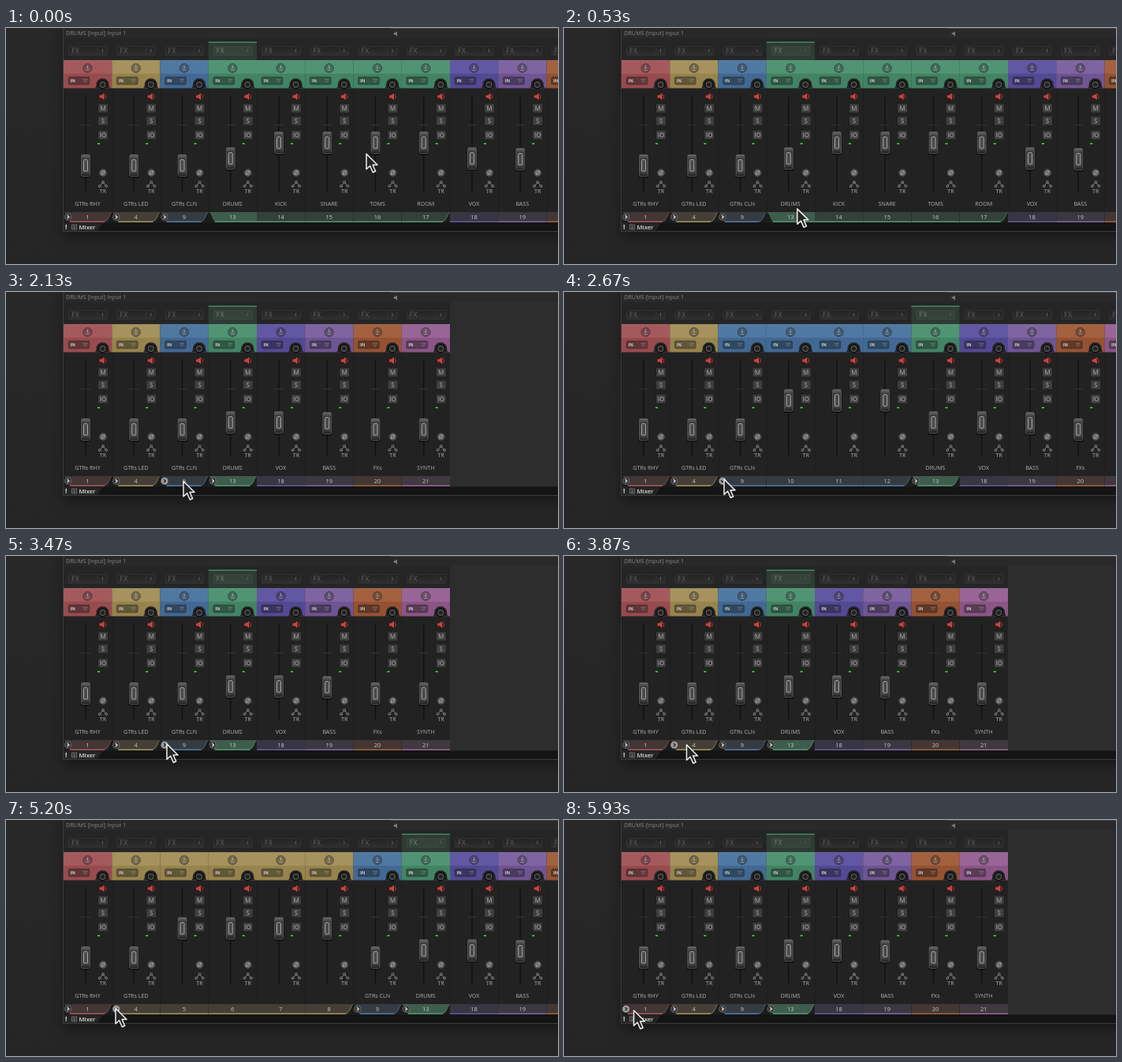
Animation, 700 px wide and 300 px high, one loop 6 s. Source, as an HTML page:

```html
<!DOCTYPE html>
<html lang="en">
<head>
<meta charset="utf-8">
<title>Mixer folders</title>
<style>
  html, body { margin: 0; width: 100%; height: 100%; overflow: hidden; background: #262626; }
  svg { display: block; width: 700px; height: 300px; }
  text { font-family: "Open Sans", "Noto Sans", sans-serif; }
  .deep { mix-blend-mode: multiply; }
  .icon circle { fill: #343434; stroke: #777; }
  .icon path { stroke: #e6e6e6; }
  .icon.hover circle { fill: #9a9a9a; stroke: #aaa; }
  .icon.hover path { stroke: #222; }
</style>
</head>
<body>
<svg id="stage" viewBox="0 0 700 300" xmlns="http://www.w3.org/2000/svg">
  <defs>
    <linearGradient id="bg" x2="0" y2="1">
      <stop offset="0" stop-color="#282828"/><stop offset="1" stop-color="#252525"/>
    </linearGradient>
    <linearGradient id="fx" x2="0" y2="1">
      <stop offset="0" stop-color="#222"/><stop offset="1" stop-color="#303030"/>
    </linearGradient>
    <linearGradient id="cap" x2="0" y2="1">
      <stop offset="0" stop-color="#6a6a6a"/><stop offset=".2" stop-color="#3c3c3c"/>
      <stop offset=".8" stop-color="#444"/><stop offset="1" stop-color="#1c1c1c"/>
    </linearGradient>
    <filter id="blur" x="-10%" y="-20%" width="120%" height="140%"><feGaussianBlur stdDeviation="9"/></filter>
  </defs>
  <rect width="700" height="300" fill="url(#bg)"/>
  <rect x="74" y="-20" width="660" height="286" fill="#000" opacity=".38" filter="url(#blur)"/>
  <rect x="72" y="-2" width="640" height="261" fill="#3c3c3c"/>
  <rect x="73" width="627" height="248" fill="#2d2d2d"/>
  <rect x="73" width="627" height="13" fill="#292929"/>
  <rect x="487" width="213" height="1" fill="#444"/>
  <text x="76" y="9" font-size="7.3" fill="#868686">DRUMS [input] Input 1</text>
  <path d="M496 4.300v6l-5-3z" fill="#777"/>
  <g id="layouts"></g>
  <rect x="73" y="247.500" width="627" height="10.500" fill="#141414"/>
  <path d="M73 247.500H126Q121 248 119 253T113 258H73z" fill="#252525"/>
  <text x="75" y="256" font-size="8.500" font-weight="700" fill="#ddd">!</text>
  <path d="M83.500 250h6v6h-6zM85 251.800h3M85 253.200h3M85 254.600h3" fill="none" stroke="#888" stroke-width=".7"/>
  <text x="92.500" y="256" font-size="7.600" font-weight="600" fill="#dcdcdc">Mixer</text>
  <path id="cursor" d="M0 0V19.500L4.600 15.300 8.300 23.500 11.700 22 8.100 14H14z" fill="#262626" stroke="#eee" stroke-width="1.500" stroke-linejoin="round"/>
</svg>
<script>
const LOOP = 6000, STEP = 1000 / 15, LEFT = 73, PITCH = 61.25;
const red = '#a6595d', yellow = '#a5925c', blue = '#5079a2', green = '#509474',
      purple = '#6257a2', violet = '#7f64a2', orange = '#a4613f', pink = '#996496';

// number, name, colour, fader centre, folder it lives in
const tracks = [
  [1, 'GTRs RHY', red, 175], [4, 'GTRs LED', yellow, 175],
  ...[5, 6, 7, 8].map(n => [n, '', yellow, 138, 4]),
  [9, 'GTRs CLN', blue, 175],
  ...[10, 11, 12].map(n => [n, '', blue, 138, 9]),
  [13, 'DRUMS', green, 166],
  ...['KICK', 'SNARE', 'TOMS', 'ROOM'].map((name, i) => [14 + i, name, green, 146, 13]),
  [18, 'VOX', purple, 166], [19, 'BASS', violet, 167],
  [20, 'FXs', orange, 175], [21, 'SYNTH', pink, 175]
].map(([num, name, color, fader, parent]) => ({ num, name, color, fader, parent }));
const folders = [1, 4, 9, 13], selected = 13;

// start time, open folder (0 = all closed)
const states = [[0, 13], [1266, 0], [2666, 9], [3466, 0], [4399, 4], [5266, 0]];

// time, x, y of the pointer tip
const path = [
  [0, 457, 160], [667, 277, 238], [933, 265, 240.5], [1067, 265, 240.5], [1133, 264, 240.5],
  [1533, 264, 240.5], [1600, 262.5, 239], [1800, 262.5, 239], [2133, 225, 240.5],
  [2400, 202, 238], [2600, 203, 238], [3000, 203, 238], [3067, 206, 238], [3333, 206, 238],
  [3467, 204, 239], [3867, 155.5, 240], [4000, 143, 239], [4133, 138, 239], [5133, 138, 239],
  [5200, 139, 239.5], [5333, 138, 240], [5800, 108, 243], [5933, 88.5, 242], [6000, 88.5, 242]
];

const rect = (x, y, w, h, fill, more = '') =>
  `<rect x="${x}" y="${y}" width="${w}" height="${h}" fill="${fill}" ${more}/>`;
const label = (x, y, size, fill, str, more = 'text-anchor="middle"') =>
  `<text x="${x}" y="${y}" font-size="${size}" fill="${fill}" ${more}>${str}</text>`;
const line = (d, stroke, w = 1) => `<path d="${d}" fill="none" stroke="${stroke}" stroke-width="${w}"/>`;
const ring = (x, y, r, fill, stroke, w = 1) =>
  `<circle cx="${x}" cy="${y}" r="${r}" fill="${fill}" stroke="${stroke}" stroke-width="${w}"/>`;

function button(y, str) {
  return rect(43.5, y, 13, 12, '#3e3e3e', 'rx="1.5" stroke="#1c1c1c"') +
    label(50, y + 9, 8, '#979797', str, 'text-anchor="middle" font-weight="600"');
}

function head(t) {
  const on = t.num === selected, edge = on ? '#3b4b43' : '#333';
  return rect(0, 13, PITCH, 28, '#252525') +
    (on ? rect(0, 17, PITCH, 24, '#2d3b34') + rect(0, 17, PITCH, 2, '#41796050') + rect(0, 17.5, PITCH, 1.5, '#417960') : '') +
    rect(6.5, 23.5, 49, 11, on ? '#33423a' : 'url(#fx)', `rx="1" stroke="${edge}"`) +
    label(10, 31.6, 8.3, on ? '#718279' : '#626262', 'FX', 'letter-spacing=".8"') +
    line('M43.5 24V34', edge) + line('M49.5 26.5V31', '#5c5c5c') +
    rect(0, 41, PITCH, 35.5, t.color) +
    rect(0, 58, PITCH, 18.5, t.color, 'class="deep" opacity=".25"') +
    rect(0, 40.5, PITCH, 1, '#fff', 'opacity=".12"') +
    ring(30.5, 51, 5.7, 'rgba(45,45,45,.4)', 'rgba(30,30,30,.45)') +
    line('M30.5 47V51.5M28.5 53.5H32.5M28.8 51.5L30.5 49.8 32.2 51.5', 'rgba(235,235,235,.45)', .9) +
    rect(6, 62, 27, 10, 'rgba(25,25,25,.42)', 'rx="2" stroke="rgba(20,20,20,.3)"') +
    label(8.5, 69, 5.6, '#d0d0d0', 'IN', 'font-weight="700"') +
    '<path d="M25 65.300h5l-2.500 4z" fill="none" stroke="#aaa" stroke-opacity=".6" stroke-width=".7"/>' +
    '<path d="M39 76.500Q41.500 76 41.500 72A8 8 0 0 1 57.500 72Q57.500 76 60 76.500z" fill="#222"/>' +
    ring(49.5, 72, 5, '#1a1a1a', '#111', 1.6) + ring(49.5, 72, 3.4, '#222', '#5a5a5a', 1.2);
}

function body(t) {
  const y = t.fader;
  return rect(0, 76.5, PITCH, 171, '#222') + rect(0, 76.5, .8, 157, '#1d1d1d') +
    line('M28 87V208', '#111', 1.4) + line('M22 123.5H34', '#333') +
    rect(21.5, y - 14.5, 13, 30, '#0d0d0d', 'rx="2" opacity=".8"') +
    rect(22.5, y - 14, 11, 27.5, 'url(#cap)', 'rx="1.5" stroke="#666" stroke-width=".7"') +
    rect(25.5, y - 7.5, 5, 14.5, '#4a4a4a', 'rx="1" stroke="#a8a8a8"') +
    '<path d="M45.500 85.500h2.500l3.500-2.700v8.600l-3.500-2.700h-2.500z" fill="#d2433a"/>' +
    line('M53 84.5Q54.6 87 53 89.8', '#b53a33') +
    button(96, 'M') + button(112, 'S') + button(130, 'IO') +
    rect(43, 146, 3, 2, '#35b83c') +
    ring(50, 184, 4.3, '#4c4c4c', '#666', .8) +
    ring(50, 184, 2.3, 'none', '#b0b0b0', .9) + line('M47.5 187L52.5 181', '#b0b0b0', .9) +
    ring(50, 196, 1.4, 'none', '#8a8a8a') + ring(45.8, 201, 1.4, 'none', '#8a8a8a') +
    ring(54.2, 201, 1.4, 'none', '#8a8a8a') + line('M49 197.2L46.8 199.7M51 197.2L53.2 199.7', '#8a8a8a') +
    label(50, 209.8, 7, '#8c8c8c', 'TR', 'text-anchor="middle" font-weight="600"') +
    label(30.5, 225.5, 7.1, '#b0b0b0', t.name);
}

function foot(t, open, last) {
  const folder = folders.includes(t.num), on = t.num === selected;
  const slanted = (folder && !open) || last;
  const start = folder ? 'M0 234Q3 235 5 241T11 246.5' : 'M0 234V246.5';
  const end = slanted ? 'H51Q55 246 57.5 240T61.25 234' : `H${PITCH}V234`;
  return rect(0, 234, PITCH, 13.5, '#1c1c1c') +
    `<path d="${start}${end}z" fill="#303030"/>` +
    `<path d="${start}${end}z" fill="${t.color}" fill-opacity="${on ? .45 : .16}"/>` +
    line(`M${folder ? 8 : 0} 246.3H${slanted ? 52 : PITCH}`, t.color, 1.6) +
    (slanted ? line('M51 246.3Q55 246 57.5 240T61 234.5', t.color, .7) : '') +
    label(30.5, 243.4, 7.5, '#cacaca', t.num) +
    (folder ? `<g class="icon">${ring(5.5, 240.3, 4.1, '', '', .8)}${
      line(open ? 'M3.5 239.3L5.5 241.7 7.5 239.3' : 'M4.6 238.2L6.8 240.3 4.6 242.4', '', 1.3)}</g>` : '');
}

// One prebuilt layout per open folder.
const layouts = {};
for (const open of [0, 4, 9, 13]) {
  const shown = tracks.filter(t => !t.parent || t.parent === open);
  const g = document.createElementNS('http://www.w3.org/2000/svg', 'g');
  g.innerHTML = shown.map((t, i) => {
    const last = t.parent && (shown[i + 1] || {}).parent !== t.parent;
    return `<g transform="translate(${LEFT + i * PITCH} 0)">${body(t)}${head(t)}${foot(t, t.num === open, last)}</g>`;
  }).join('');
  document.getElementById('layouts').append(g);
  const icons = [...g.querySelectorAll('.icon')].map((el, k) => {
    const i = shown.findIndex(t => t.num === folders[k]);
    return { el, x: LEFT + i * PITCH, open: folders[k] === open };
  });
  layouts[open] = { g, icons };
}

const cursor = document.getElementById('cursor');

function pointer(t) {
  const i = path.findIndex(p => p[0] > t);
  const [t0, x0, y0] = path[i - 1], [t1, x1, y1] = path[i];
  const u = (t - t0) / (t1 - t0), e = u * u * (3 - 2 * u);
  return [x0 + (x1 - x0) * e, y0 + (y1 - y0) * e];
}

function draw(now) {
  const t = Math.floor((now % LOOP) / STEP + .05) * STEP % LOOP;
  const open = states.filter(s => s[0] <= t).pop()[1];
  const [x, y] = pointer(t);
  for (const key in layouts) layouts[key].g.style.display = +key === open ? '' : 'none';
  for (const icon of layouts[open].icons) {
    const hover = y > 234 && x >= icon.x && x < icon.x + PITCH;
    icon.el.style.display = hover || !icon.open ? '' : 'none';
    icon.el.classList.toggle('hover', hover);
  }
  cursor.setAttribute('transform', `translate(${x} ${y})`);
}

const begin = performance.now();
function tick() {
  draw(performance.now() - begin);
  requestAnimationFrame(tick);
}
tick();
</script>
</body>
</html>
```
